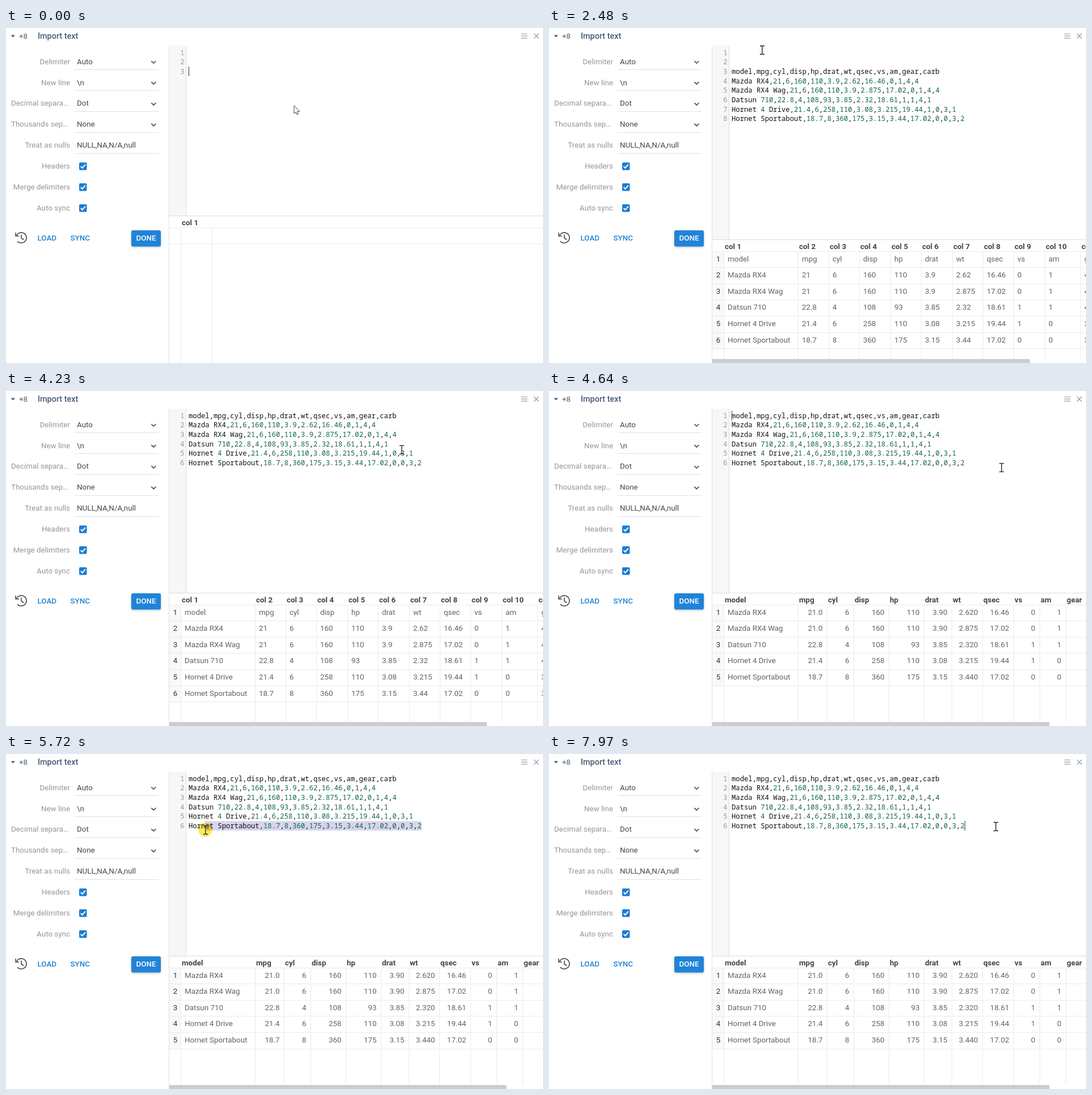
An HTML page that plays this animation: 947 by 591 pixels, repeating every 8000 ms.

```html
<!DOCTYPE html>
<html lang="en">
<head>
<meta charset="utf-8">
<title>Import text</title>
<style>
html, body { margin: 0; width: 100%; height: 100%; overflow: hidden; background: #fff; }
svg { display: block; }
text { font: 13.4px Roboto, sans-serif; fill: #636363; white-space: pre; }
.label { fill: #92969b; }
.value { fill: #40474f; }
.title { font-size: 14.4px; font-weight: 500; fill: #435a78; }
.slate { fill: #4b5f7a; }
.button { font-weight: 500; fill: #2083d5; }
.white { fill: #fff; }
.head { font-weight: 700; fill: #444; }
.row { fill: #333; }
.code, .gutter { font: 12.233px "Noto Sans Mono", monospace; fill: #111; }
.code { font-weight: 500; }
.gutter { fill: #999; }
.num { fill: #116644; }
.icon { fill: none; stroke: #40474f; stroke-width: 1.6; }
.gray { stroke: #969a9f; stroke-width: 1.2; }
.raised { filter: drop-shadow(0 1px 2px #0004); }
#halo { fill: #ffe62e; opacity: .85; mix-blend-mode: multiply; }
</style>
</head>
<body>
<svg id="stage" width="947" height="591" viewBox="0 0 947 591">
  <g id="form"></g>
  <g id="editor"></g>
  <rect id="selection" y="118.5" height="16.5" fill="#d7d4f0"/>
  <g id="code"></g>
  <g id="table"></g>
  <rect id="caret" width="1" height="17" fill="#333"/>
  <circle id="halo" r="12.3"/>
  <g id="beam" fill="none">
    <path d="M-4-7.5H-1.5L0-6.5 1.5-7.5H4M0-6.5V6.5M-4 7.5H-1.5L0 6.5 1.5 7.5H4" stroke="#fff" stroke-width="2.6" opacity=".7"/>
    <path d="M-4-7.5H-1.5L0-6.5 1.5-7.5H4M0-6.5V6.5M-4 7.5H-1.5L0 6.5 1.5 7.5H4" stroke="#111" stroke-width="1.3"/>
  </g>
  <path id="arrow" d="M0 0V14L3.1 11.2 5.2 16 7.4 15 5.4 10.3H9.8Z" fill="#fff" stroke="#444"/>
</svg>
<script>
const LOOP = 8000, CHAR = 7.34, LINE = 16.67, ROW = 28.6, CODE_X = 322;
const PASTE = 530, DELETE_1 = 3010, DELETE_2 = 3410, FILL = 1500, REFILL = 4370;
const csv = [
  'model,mpg,cyl,disp,hp,drat,wt,qsec,vs,am,gear,carb',
  'Mazda RX4,21,6,160,110,3.9,2.62,16.46,0,1,4,4',
  'Mazda RX4 Wag,21,6,160,110,3.9,2.875,17.02,0,1,4,4',
  'Datsun 710,22.8,4,108,93,3.85,2.32,18.61,1,1,4,1',
  'Hornet 4 Drive,21.4,6,258,110,3.08,3.215,19.44,1,0,3,1',
  'Hornet Sportabout,18.7,8,360,175,3.15,3.44,17.02,0,0,3,2'
];
const cells = csv.map(line => line.split(','));
const END = csv[5].length;
const decimals = [0, 1, 0, 0, 0, 2, 3, 2, 0, 0, 0, 0];
const typedCols = [308, 439, 490, 537, 599, 661, 710, 764, 819, 865, 911];
const rawCols = [308, ...Array.from({ length: 9 }, (_, i) => Math.floor(439 + 54.4 * i)), 937];

// time, x, y of the pointer
const path = [
  [0, 508, 137], [130, 508, 144], [260, 503, 144], [790, 503, 144], [1310, 406, 77],
  [1590, 382, 56], [1800, 376, 39], [3610, 376, 39], [4370, 770, 118], [4640, 798, 135],
  [4850, 833, 149], [5120, 769, 138], [5190, 769, 138], [5720, 352, 134], [6040, 328, 131],
  [6250, 314, 131], [7010, 314, 131], [7480, 852, 134], [7690, 788, 128], [LOOP, 788, 128]
];
const presses = [[1930, 2000], [5190, 6700], [7830, 7970]];
// blink start, line, column
const carets = [[-400, 2, 0], [PASTE, 7, END], [1950, 0, 0], [DELETE_2, 0, 0], [5190, 5, END], [7830, 5, END]];

const $ = id => document.getElementById(id);
const text = (x, y, s, cls = '', anchor = 'start') =>
  `<text x="${x}" y="${Math.floor(y)}" class="${cls}" text-anchor="${anchor}">${s}</text>`;
const rect = (x, y, w, h, fill, r = 0, cls = '') =>
  `<rect x="${x}" y="${y}" width="${w}" height="${h}" fill="${fill}" rx="${r}" class="${cls}"/>`;
const icon = (d, cls = '') => `<path class="icon ${cls}" d="${d}"/>`;
const hline = (y, color = '#ebebeb') => rect(288, Math.floor(y), 659, 1, color);
const vline = (x, y, bottom, color = '#ebebeb') => rect(x, y, 1, bottom - y, color);

function drawForm() {
  const fields = [['Delimiter', 'Auto'], ['New line', '\\n'], ['Decimal separa…', 'Dot'],
    ['Thousands sep…', 'None'], ['Treat as nulls', 'NULL,NA,N/A,null'],
    ['Headers'], ['Merge delimiters'], ['Auto sync']];
  let out = '<path d="M8.5 12.5h7.5l-3.75 4z" fill="#435a78"/>' +
    text(23, 19, '+8', 'slate') + text(56, 19, 'Import text', 'title') +
    icon('M908.5 10.5h11m-11 3.7h11m-11 3.7h11M931 10l8.5 8.5m0-8.5l-8.5 8.5', 'gray');
  fields.forEach(([label, value], i) => {
    const y = 59.2 + 36.9 * i, cut = label.endsWith('…');
    out += text(cut ? 9 : 113, y + 4.9, label, 'label', cut ? 'start' : 'end');
    if (value) {
      out += text(125, y + 4.9, value, 'value') + rect(121, Math.round(y + 13.7), 148, 1, '#dfe0e2');
      if (i < 4) out += icon(`M256.3 ${y - 1}l4 4 4-4`);
    } else {
      out += rect(129, y - 6.5, 13.5, 13.5, '#1c7cd5', 2) +
        `<path d="M131.7 ${y + .4}l2.8 2.9 5.4-6.2" fill="none" stroke="#fff" stroke-width="2"/>`;
    }
  });
  out += icon('M18.6 366A9.2 9.2 0 1 1 20 376.2M17 361v6h6M27 364.5v6l4.2 3') +
    text(55.5, 375, 'LOAD', 'button') + text(113.5, 375, 'SYNC', 'button') +
    rect(221, 357, 52, 28.5, '#2083d8', 3, 'raised') +
    text(247, 375, 'DONE', 'button white', 'middle');
  $('form').innerHTML = out;
}

function drawEditor(lines, split) {
  const baseline = i => 48.1 + LINE * i;
  $('editor').innerHTML = rect(288, 31, 29, split - 31, '#f7f7f7') + vline(317, 31, split, '#ddd') +
    vline(287, 31, 591, '#e0e0e0') +
    lines.map((_, i) => text(314.5, baseline(i), i + 1, 'gutter', 'end')).join('');
  $('code').innerHTML = lines.map((line, i) => text(CODE_X, baseline(i),
    line.replace(/\b\d[\d.]*/g, n => `<tspan class="num">${n}</tspan>`), 'code')).join('');
}

function drawTable(mode, split) {
  const top = split + 21, typed = mode === 2;
  const cols = mode ? (typed ? typedCols : rawCols) : [308, 363];
  const rows = mode ? cells.slice(typed ? 1 : 0) : [];
  const count = rows.length || 1;
  let out = hline(split, '#dcdcdc') + hline(top);
  if (mode) out += rect(288, top + 1, 20, ROW * count, '#f9f9f9');
  for (let i = 1; i <= count; i++) out += hline(top + ROW * i);
  cols.forEach((x, c) => {
    out += vline(x, top, 591);
    if (mode || !c) out += text(x + 2, split + 17, typed ? cells[0][c] : `col ${c + 1}`, 'head');
  });
  rows.forEach((row, r) => {
    const y = top + ROW * r + 18;
    out += text(298.5, y, r + 1, 'row', 'middle');
    cols.forEach((x, c) => {
      if (!typed || !c) out += text(x + 7, y, row[c]);
      else if (c < 10) out += text(cols[c + 1] - 7.5, y, (+row[c]).toFixed(decimals[c]), '', 'end');
    });
  });
  if (mode) out += rect(288, 584, 659, 7, '#fff') + rect(288, 584, typed ? 594.5 : 560, 7, '#cdcdcd');
  $('table').innerHTML = out;
}

function pointerAt(t) {
  const i = path.findIndex(p => p[0] > t), [t0, x0, y0] = path[i - 1], [t1, x1, y1] = path[i];
  const k = (t - t0) / (t1 - t0);
  return [x0 + (x1 - x0) * k, y0 + (y1 - y0) * k];
}

const show = (id, on) => $(id).setAttribute('visibility', on ? 'visible' : 'hidden');
const move = (id, x, y) => $(id).setAttribute('transform', `translate(${x} ${y})`);
let drawn = '';

function render(t) {
  const blanks = t < PASTE ? 3 : t < DELETE_1 ? 2 : t < DELETE_2 ? 1 : 0;
  const mode = t < FILL ? 0 : t < REFILL ? 1 : 2;
  if (drawn !== `${blanks} ${mode}`) {
    drawn = `${blanks} ${mode}`;
    const lines = [...Array(blanks).fill(''), ...(t < PASTE ? [] : csv)];
    const split = Math.round(331 + (lines.length - 3) * 8.4);
    drawEditor(lines, split);
    drawTable(mode, split);
  }

  const [x, y] = t < 130 ? path[0].slice(1) : pointerAt(t);
  const arrow = t < 130 || (t >= 6700 && x < 318);
  show('arrow', arrow);
  show('beam', !arrow);
  move(arrow ? 'arrow' : 'beam', x, y);
  show('halo', presses.some(([a, b]) => t >= a && t < b));
  move('halo', x - .5, y - .5);

  let from = END;
  if (t >= 5190 && t < 7830) {
    const dragX = t < 6250 ? x : CODE_X;
    from = Math.max(0, Math.min(END, Math.round((dragX - CODE_X) / CHAR)));
  }
  $('selection').setAttribute('x', CODE_X + from * CHAR);
  $('selection').setAttribute('width', (END - from) * CHAR);

  const [start, line, col] = carets.findLast(c => c[0] <= t);
  show('caret', from === END && (t - start) % 1060 < 530);
  move('caret', Math.round(CODE_X + col * CHAR), Math.round(35 + line * LINE));
}

function tick() {
  render(performance.now() % LOOP);
  requestAnimationFrame(tick);
}
drawForm();
tick();
</script>
</body>
</html>
```
